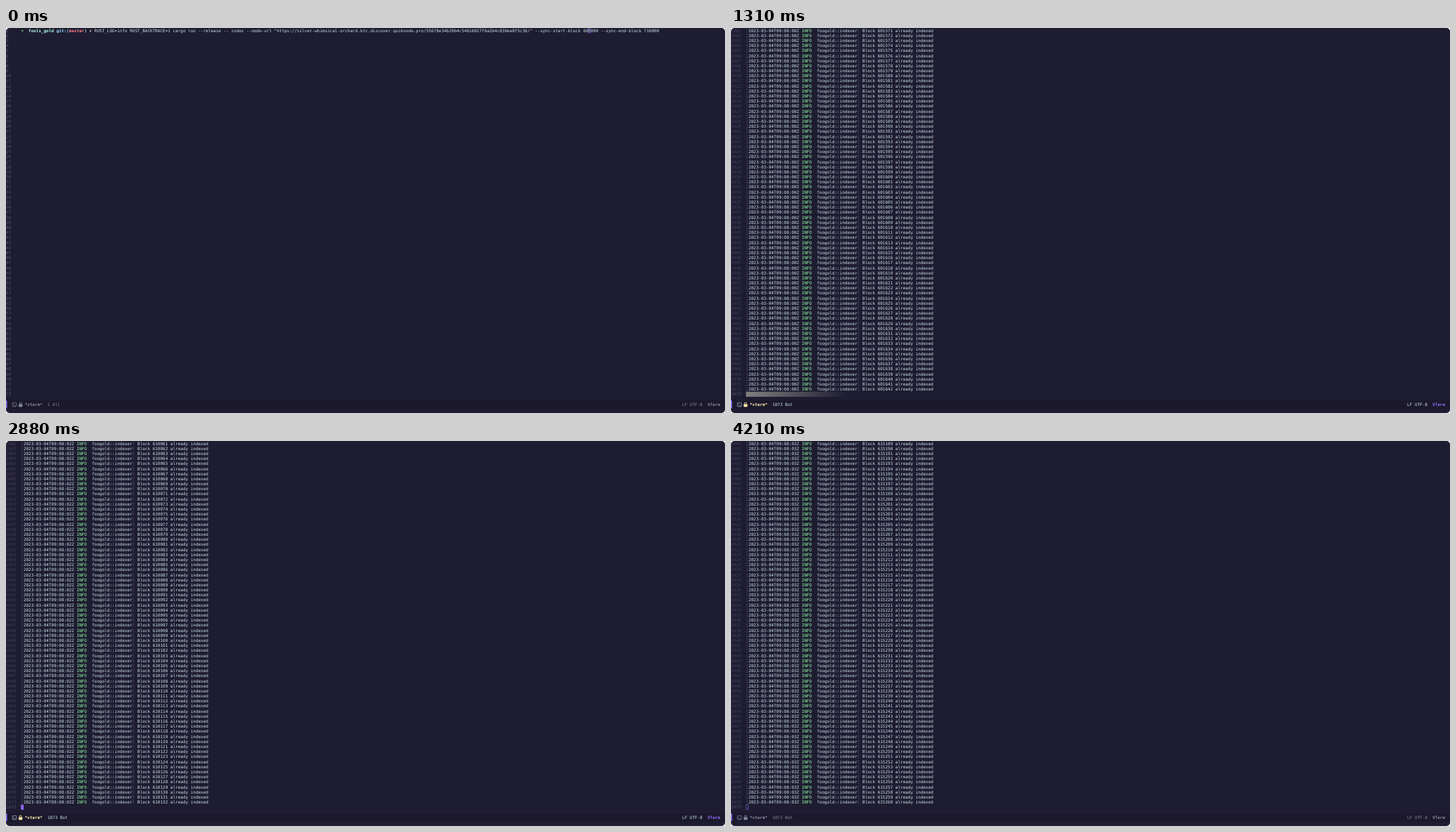
An HTML page for the animation above (4.48 s loop, 1023 by 548 pixels).

```html
<!DOCTYPE html>
<html lang="en">
<head>
<meta charset="utf-8">
<title>Terminal</title>
<style>
  html, body { margin: 0; width: 100%; height: 100%; overflow: hidden; background: #fff; }
  #window {
    position: absolute; width: 1023px; height: 548px; overflow: hidden;
    border-radius: 5px; background: #1e1c31;
  }
  /* Laid out ten times larger so that small text keeps fractional advances. */
  #stage {
    position: absolute; width: 10230px; height: 5480px;
    transform: scale(.1); transform-origin: 0 0;
    font: 59.85px/71.9px "DejaVu Sans Mono", monospace;
    text-rendering: geometricPrecision; font-variant-ligatures: none;
    color: #cbe3e7;
  }
  pre, #modeline span { position: absolute; margin: 0; font: inherit; white-space: pre; }
  #numbers { left: 0; top: 0; font-style: italic; color: #565575; }
  #numbers.log { color: #43415d; }
  #numbers .current { color: #565575; }
  #screen { left: 213px; top: 0; }
  b { font-weight: bold; }
  .symbol { display: inline-block; width: 1ch; line-height: 0; }
  .green { color: #95ffa4; }
  .cyan { color: #aaffe4; }
  .blue { color: #91ddff; }
  .red { color: #ff8080; }
  .yellow { color: #ffe9aa; }
  .dim { color: #565575; }
  #cursor {
    position: absolute; box-sizing: border-box; width: 37px; height: 72px;
    color: #1e1c31; white-space: pre;
  }
  #cursor.solid { background: #906cff; }
  #cursor.hollow { border: 5px solid #906cff; color: transparent; }
  #cursor.off { display: none; }
  #beacon {
    position: absolute; left: 213px; top: 5177px; width: 1441px; height: 72px;
    background: linear-gradient(90deg, #808080, #1e1c31);
  }
  #modeline {
    position: absolute; left: 0; top: 5304px; width: 100%; height: 108px;
    line-height: 108px; background: #1b182c; color: #cbe3e7;
  }
  #modeline::before {
    content: ""; position: absolute; width: 15px; height: 100%; background: #906cff;
  }
  #modeline svg { position: absolute; left: 80px; top: 14px; fill: none; stroke-width: 7; }
  #buffer { left: 267px; color: #ffe9aa; font-weight: bold !important; }
  #position { left: 589px; }
  #coding { left: 9621px; }
  #mode { left: 9980px; color: #906cff; font-weight: bold !important; }
  #prompt-icon { stroke: #a9b6c2; }
  #lock { stroke: #ffe9aa; }
  #lock rect { fill: #ffe9aa; }
  #modeline.inactive, .inactive #buffer, .inactive #mode { color: #858a9c; }
  .inactive #prompt-icon, .inactive #lock { stroke: #858a9c; }
  .inactive #lock rect { fill: #858a9c; }
</style>
</head>
<body>
<div id="window">
  <div id="stage">
    <pre id="numbers"></pre>
    <div id="beacon"></div>
    <pre id="screen"></pre>
    <div id="cursor"></div>
    <div id="modeline">
      <svg width="170" height="90">
        <g id="prompt-icon">
          <rect x="11" y="15" width="58" height="56" rx="9"/>
          <path d="M23 31l13 12-13 12M40 57h17"/>
        </g>
        <g id="lock">
          <rect x="104" y="40" width="46" height="32" rx="4"/>
          <path d="M112 40V27a15 15 0 0 1 30 0v13" stroke-width="9"/>
        </g>
      </svg>
      <span id="buffer">*vterm*</span>
      <span id="position"></span>
      <span id="coding">LF UTF-8</span>
      <span id="mode">VTerm</span>
    </div>
  </div>
</div>
<script>
const LOOP = 4480, ROWS = 73, COLUMN = 36.03, LINE = 71.9;
const el = id => document.getElementById(id);
const tag = (cls, text, name = "b") => `<${name} class="${cls}">${text}</${name}>`;
const span = (cls, text) => tag(cls, text, "span");

const url = "https://silver-whimsical-orchard.btc.discover.quiknode.pro/55678e34b29b4c54616027f6a3b4c830ee8f5c36/";
const range = "--sync-start-block 600000 --sync-end-block 710000";
const prompt = tag("green symbol", "➜") + "  " + tag("cyan", "fools_gold") + " " +
  tag("blue", "git:(") + tag("red", "master") + tag("blue", ")") + " " +
  tag("yellow symbol", "✗") +
  ` RUST_LOG=info RUST_BACKTRACE=1 cargo run --release -- index --node-url "${url}" ${range}`;
const build = "\n    " + tag("green", "Finished") + " release [optimized] target(s) in 0.05s" +
  "\n     " + tag("green", "Running") + ` \`target/release/foogold index --node-url '${url}' ${range}\``;

// Times in ms; last is the newest indexed block, second its log time.
const editing = (at, cursor) =>
  ({ at, cursor, text: prompt, row: 0, column: 224, under: "0", position: "1 All" });
const logging = (at, last, second, cursor, partial = "") => ({
  at, cursor, last, second, partial, row: ROWS - 1, column: partial.length, position: "1073 Bot"
});
const states = [
  editing(0, "hollow"),
  editing(250, "solid"),
  editing(510, "off"),
  editing(780, "solid"),
  { at: 1050, cursor: "solid", text: prompt + build, row: 3, column: 0, position: "4 All" },
  { ...logging(1310, 601642, 0, "off"), beacon: true },
  logging(1570, 602710, 1, "solid"),
  logging(1830, 603778, 1, "solid", "[202"),
  logging(2100, 605412, 1, "solid"),
  logging(2360, 606985, 2, "off"),
  logging(2620, 608559, 2, "solid"),
  logging(2880, 610132, 2, "solid"),
  logging(3150, 611622, 2, "off"),
  logging(3420, 613111, 3, "off"),
  logging(3680, 614545, 3, "solid"),
  logging(3950, 614545, 3, "off"),
  logging(4210, 615260, 3, "hollow")
];

function logText({ last, second, partial }) {
  const head = span("dim", "[") + `2023-03-04T09:08:0${second}Z ` + span("green", "INFO") +
    "  foogold::indexer" + span("dim", "]") + " Block ";
  const lines = Array.from({ length: ROWS - 1 }, (_, i) =>
    head + (last - ROWS + 2 + i) + " already indexed");
  lines.push(partial.replace("[", span("dim", "[")));
  return lines.join("\n");
}

function lineNumbers(first) {
  return Array.from({ length: ROWS }, (_, i) =>
    first && i === ROWS - 1 ? span("current", first + i + 1) : first + i + 1).join("\n");
}

function show(state) {
  const log = Boolean(state.last);
  el("numbers").className = log ? "log" : "";
  el("numbers").innerHTML = lineNumbers(log ? 1000 : 0);
  el("screen").innerHTML = log ? logText(state) : state.text;
  el("beacon").hidden = !state.beacon;
  const cursor = el("cursor");
  cursor.className = state.cursor;
  cursor.textContent = state.under || "";
  cursor.style.left = 213 + state.column * COLUMN + "px";
  cursor.style.top = state.row * LINE + "px";
  el("position").textContent = state.position;
  el("modeline").className = state.cursor === "hollow" ? "inactive" : "";
}

let shown;
function tick() {
  const time = performance.now() % LOOP;
  const state = states.findLast(s => s.at <= time);
  if (state !== shown) show(shown = state);
  requestAnimationFrame(tick);
}
tick();
</script>
</body>
</html>
```
